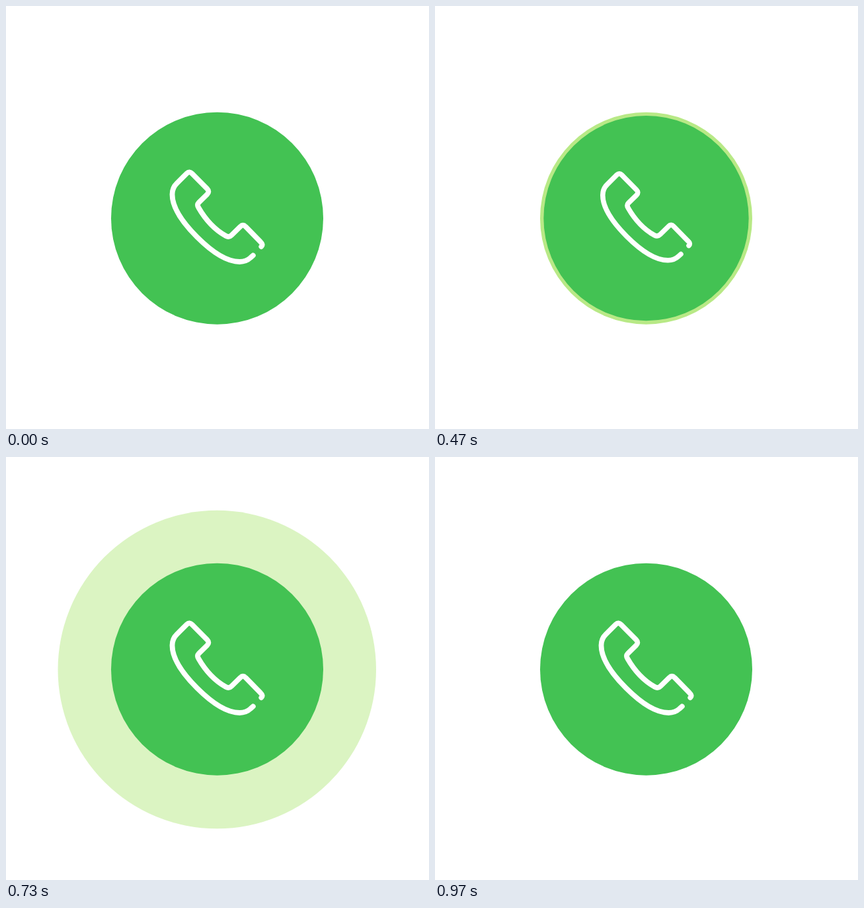
An HTML page for the animation above (1810 ms loop, 640 by 640 pixels).

```html
<!DOCTYPE html>
<html lang="en">
<head>
<meta charset="utf-8">
<title>Call button</title>
<style>
  html, body { margin: 0; height: 100%; overflow: hidden; background: #fff; }
  svg { display: block; width: 100%; height: 100%; }
</style>
</head>
<body>
<svg viewBox="0 0 640 640">
  <circle id="ring" fill="#b8e986"/>
  <g id="button">
    <circle cx="319.5" cy="321.2" r="160.5" fill="#43c253"/>
    <path fill="none" stroke="#fff" stroke-width="7.8" stroke-linecap="round" stroke-linejoin="round"
      d="M386.3 364Q389.5 361 385 356.8L362.5 333.8Q358.5 329.5 354.5 333.8L341.5 346.5
         Q337.5 350.5 332.5 347.8C315 338 300.5 321 291.3 305Q288.5 300.5 291.8 297.2
         L304.3 285Q308.5 280.8 304.3 276.6L281.5 253.5Q277.5 249.3 273.5 253.2L258.5 268.2
         C253 273.5 251.5 278.5 251.5 285C251.5 306 268 328.5 289 349.5
         C310 370.5 332.5 387 353.5 387C360 387 365 385.5 370.3 380.5L373.8 377.4"/>
  </g>
</svg>
<script>
const LOOP = 1810, CX = 319.5, CY = 321.2, R = 160.5;
const PRESS = 10, PULSE = 12, END = 24;
const ring = document.getElementById('ring');
const button = document.getElementById('button');

// 25 steps per second, snapped to a 30 Hz clock in units of 10 ms
const startOf = n => Math.round(Math.round(n * 1.2) * 10 / 3) * 10;

function stepAt(ms) {
  let n = 0;
  while (n < END && startOf(n + 1) <= ms) n++;
  return n;
}

function draw(ms) {
  const n = stepAt(ms);
  const scale = n <= PRESS ? 1 - n / 100 : Math.min(1, 0.9 + (n - PRESS) / 30);
  button.setAttribute('transform',
    `translate(${CX} ${CY}) scale(${scale}) translate(${-CX} ${-CY})`);

  const u = (n - PULSE) / (END - PULSE);
  const on = u >= 0 && u < 1;
  ring.setAttribute('cx', CX - 0.5 * u);
  ring.setAttribute('cy', CY + 0.8 * u);
  ring.setAttribute('r', on ? R * (1 + u) : 0);
  ring.setAttribute('opacity', on ? 1 - u : 0);
}

const t0 = performance.now();
function tick() {
  draw((performance.now() - t0) % LOOP);
  requestAnimationFrame(tick);
}
tick();
</script>
</body>
</html>
```
